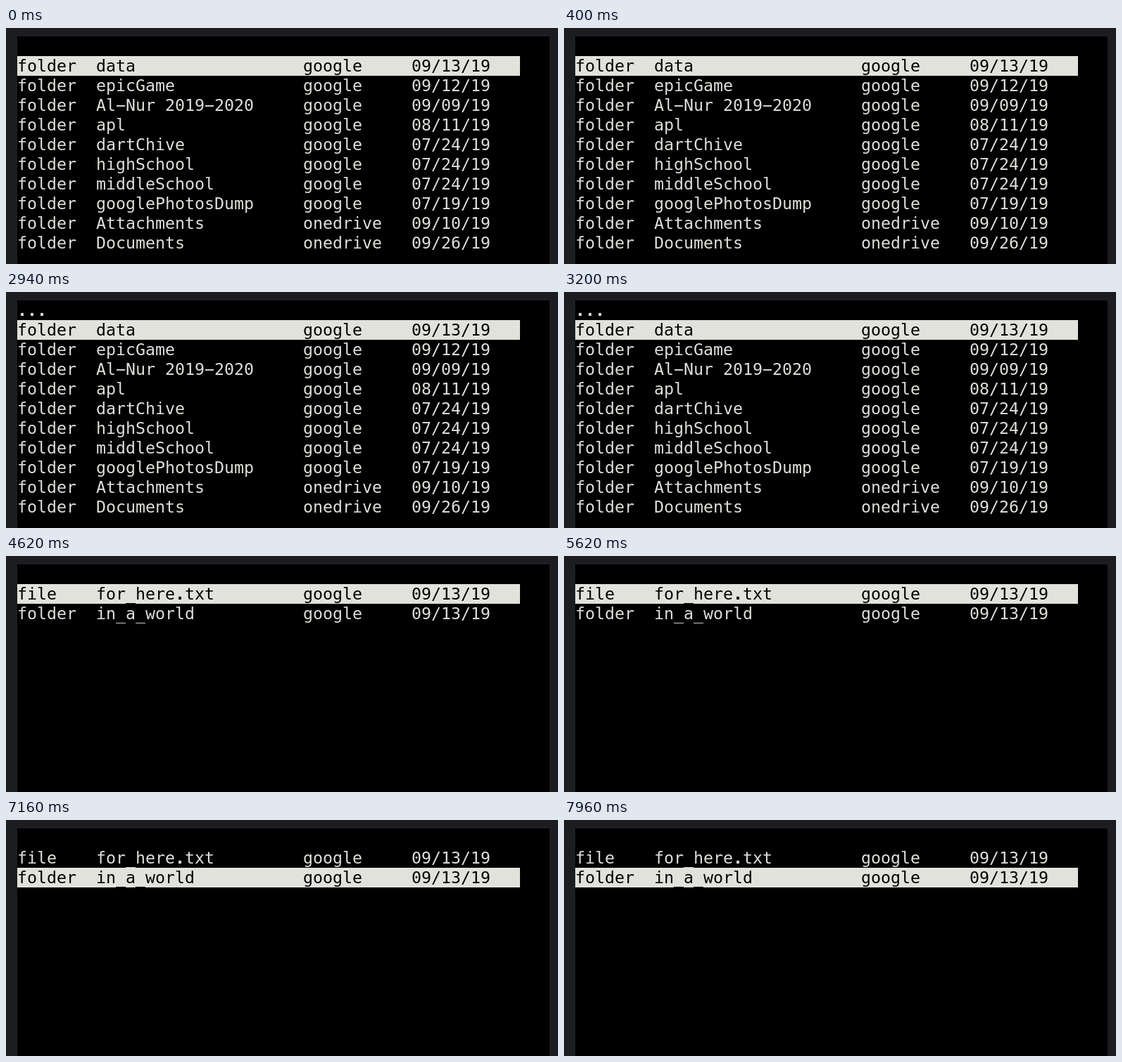
These frames come from a looping animation (784 by 336 pixels, 8 s). An HTML page with a canvas:

```html
<!DOCTYPE html>
<html lang="en">
<head>
<meta charset="utf-8">
<title>Cloud file browser</title>
<style>
  html, body { margin: 0; width: 100%; height: 100%; overflow: hidden; background: #000; }
  canvas { display: block; }
</style>
</head>
<body>
<canvas id="screen" width="784" height="336"></canvas>
<script>
const ctx = document.getElementById("screen").getContext("2d");

const LOOP = 8000;
const LOADING_AT = 2680, OPEN_AT = 4620, NEXT_AT = 7160;

const CELL = 14, ROW = 28, LEFT = 16, TOP = 12, BASELINE = 22;
const COLUMNS = [0, 8, 29, 40], LINE_CELLS = 51;
const FONT = '23.25px "DejaVu Sans Mono", monospace';
const INK = "#dededa", BAR = "#e2e2dc", FRAME = "#1c1d21";

const rootList = [
  ["folder", "data", "google", "09/13/19"],
  ["folder", "epicGame", "google", "09/12/19"],
  ["folder", "Al−Nur 2019−2020", "google", "09/09/19"],
  ["folder", "apl", "google", "08/11/19"],
  ["folder", "dartChive", "google", "07/24/19"],
  ["folder", "highSchool", "google", "07/24/19"],
  ["folder", "middleSchool", "google", "07/24/19"],
  ["folder", "googlePhotosDump", "google", "07/19/19"],
  ["folder", "Attachments", "onedrive", "09/10/19"],
  ["folder", "Documents", "onedrive", "09/26/19"]
];
const dataList = [
  ["file", "for_here.txt", "google", "09/13/19"],
  ["folder", "in_a_world", "google", "09/13/19"]
];

function write(text, column, row, color) {
  ctx.fillStyle = color;
  [...text].forEach((char, i) => {
    // Periods are heavier than the other glyphs.
    ctx.font = char === "." ? "bold " + FONT : FONT;
    ctx.fillText(char, LEFT + (column + i) * CELL, TOP + row * ROW + BASELINE);
  });
}

function drawList(entries, selected) {
  entries.forEach((entry, i) => {
    const row = i + 1, active = i === selected;
    if (active) {
      ctx.fillStyle = BAR;
      ctx.fillRect(LEFT, TOP + row * ROW, LINE_CELLS * CELL, ROW);
    }
    entry.forEach((text, c) => write(text, COLUMNS[c], row, active ? "#000" : INK));
  });
}

function draw(time) {
  ctx.fillStyle = FRAME;
  ctx.fillRect(0, 0, 784, 336);
  ctx.fillStyle = "#000";
  ctx.fillRect(LEFT, TOP, 756, 324);

  if (time < OPEN_AT) {
    if (time >= LOADING_AT) write("...", 0, 0, INK);
    drawList(rootList, 0);
  } else {
    drawList(dataList, time < NEXT_AT ? 0 : 1);
  }
}

const start = performance.now();
function tick() {
  draw((performance.now() - start) % LOOP);
  requestAnimationFrame(tick);
}
tick();
</script>
</body>
</html>
```
